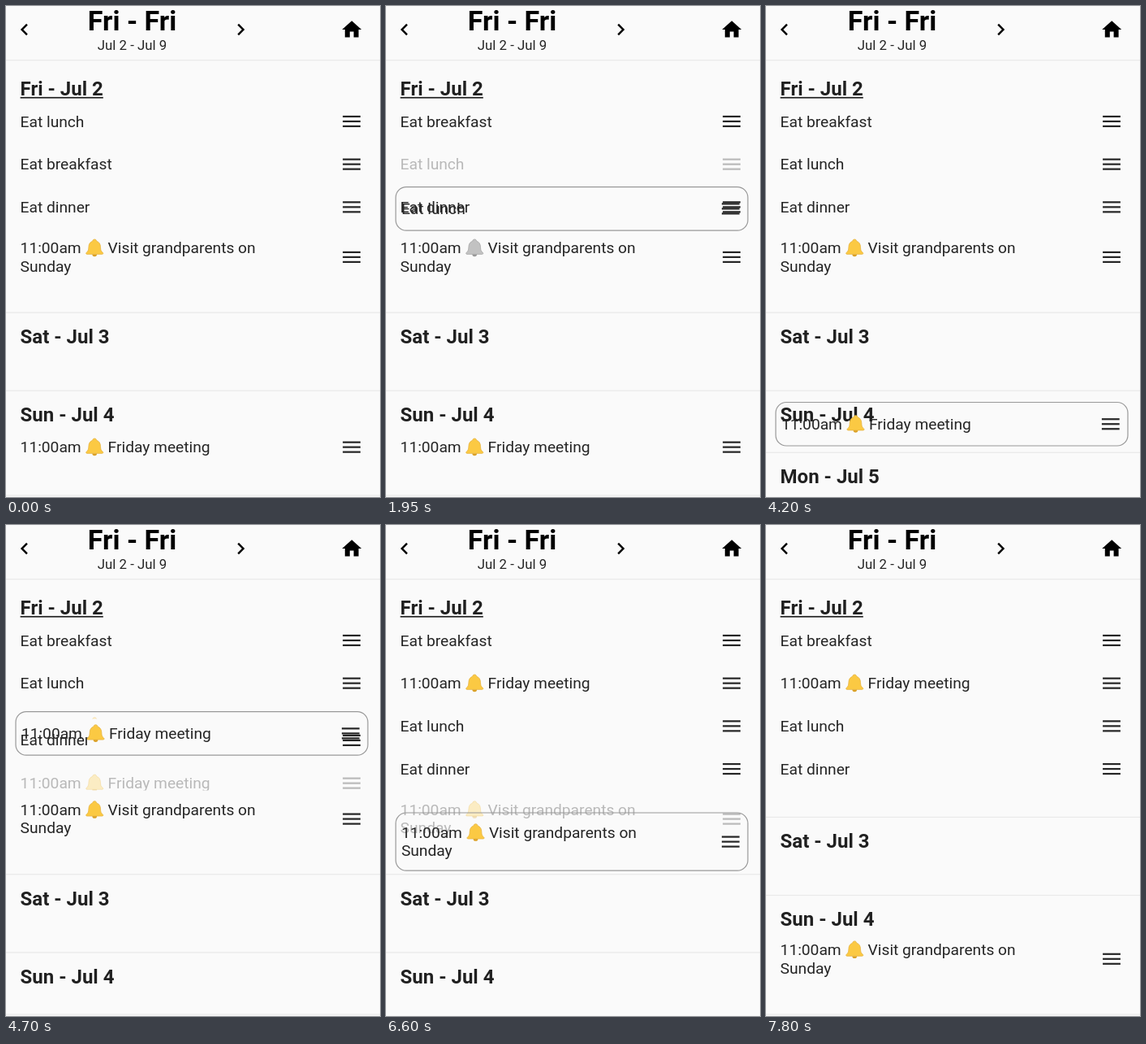
Animation of 461x604 px, one loop 9.45 s. Source, as an HTML page with a canvas:

```html
<!DOCTYPE html>
<html lang="en">
<head>
<meta charset="utf-8">
<title>Week planner</title>
<style>
  html, body { margin: 0; width: 100%; height: 100%; overflow: hidden; background: #fafafa; }
  canvas { display: block; width: 461px; height: 604px; }
</style>
</head>
<body>
<canvas id="stage"></canvas>
<script>
const W = 461, H = 604, LOOP = 9450, STEP = 50;
const ROW = 52.7, LINE = 22.5, TALL = 70.4;
const INK = '#252525', FONT = 'Roboto, sans-serif';
const canvas = document.getElementById('stage');
const ctx = canvas.getContext('2d');
const ratio = window.devicePixelRatio || 1;
canvas.width = W * ratio;
canvas.height = H * ratio;

const TASKS = {
  lunch: { lines: ['Eat lunch'] },
  breakfast: { lines: ['Eat breakfast'] },
  dinner: { lines: ['Eat dinner'] },
  visit: { time: '11:00am', lines: ['Visit grandparents on', 'Sunday'] },
  meeting: { time: '11:00am', lines: ['Friday meeting'] }
};
const ICONS = {
  home: new Path2D('M10 20v-6h4v6h5v-8h3L12 3 2 12h3v8z'),
  prev: new Path2D('M15.41 7.41L14 6l-6 6 6 6 1.41-1.41L10.83 12z'),
  next: new Path2D('M10 6L8.59 7.41 13.17 12l-4.58 4.59L10 18l6-6z')
};
const BELL = new Path2D('M11 0C12.6 0 13.4 1 13.4 2.2C16.8 3.2 18.2 6 18.3 9.5C18.4 13.2 19 14.8 21 16.2C22 17 21.6 18.3 20.3 18.3H1.7C.4 18.3 0 17 1 16.2C3 14.8 3.6 13.2 3.7 9.5C3.8 6 5.2 3.2 8.6 2.2C8.6 1 9.4 0 11 0Z');

const clamp = v => Math.max(0, Math.min(1, v));
// Linear 150 ms size change whose first visible step is at t0.
const grow = (t, t0) => t < t0 ? 0 : clamp((t - t0 + STEP) / 150);
const height = id => TASKS[id].lines.length > 1 ? TALL : ROW;

// Monotone cubic through [time, value] points.
function track(points, t) {
  const n = points.length - 1;
  if (t <= points[0][0]) return points[0][1];
  if (t >= points[n][0]) return points[n][1];
  const slope = i => (points[i + 1][1] - points[i][1]) / (points[i + 1][0] - points[i][0]);
  const tangent = i => {
    if (i === 0 || i === n) return 0;
    const a = slope(i - 1), b = slope(i);
    return a * b > 0 ? 2 * a * b / (a + b) : 0;
  };
  let i = 0;
  while (t > points[i + 1][0]) i++;
  const [t0, v0] = points[i], [t1, v1] = points[i + 1];
  const d = t1 - t0, u = (t - t0) / d, w = 1 - u;
  return v0 * (1 + 2 * u) * w * w + d * tangent(i) * u * w * w
    + v1 * u * u * (3 - 2 * u) - d * tangent(i + 1) * u * u * w;
}

const DRAGS = [
  { id: 'lunch', from: 1200, to: 2400, path: [[1200, 115.5], [1450, 168.7], [2050, 225], [2100, 225], [2200, 238]] },
  { id: 'meeting', from: 4000, to: 5350, path: [[4000, 516], [4200, 487.5], [4500, 342], [4750, 208], [4900, 166], [5000, 160.5]] },
  { id: 'visit', from: 6300, to: 7800, path: [[6300, 326.5], [6600, 354], [7100, 457], [7200, 482], [7400, 520], [7500, 525]] }
];

const ghost = (id, size) => ({ id, size, alpha: 0.3 });

// Lists of tasks per day; `fixed` keeps the list height while rows inside settle.
function plan(t) {
  const fri = { name: 'Fri - Jul 2', underline: true, pad: 0 };
  const sat = { name: 'Sat - Jul 3', pad: 20, rows: [] };
  const sun = { name: 'Sun - Jul 4', pad: 0, rows: ['meeting'] };
  const mon = { name: 'Mon - Jul 5', pad: 20, rows: [] };
  if (t < 1200) {
    fri.rows = ['lunch', 'breakfast', 'dinner', 'visit'];
  } else if (t < 2400) {
    const q = grow(t, 1700);
    fri.rows = [ghost('lunch', grow(t, 1200) * (1 - q)), 'breakfast', ghost('lunch', q), 'dinner', 'visit'];
    fri.fixed = 3 * ROW + TALL;
  } else if (t < 4000) {
    fri.rows = ['breakfast', 'lunch', ghost('lunch', 1 - grow(t, 2400)), 'dinner', 'visit'];
    fri.fixed = 3 * ROW + TALL;
  } else if (t < 5350) {
    const [a, b, c, d] = [4300, 4550, 4700, 4900].map(s => grow(t, s));
    const g = size => ghost('meeting', size);
    fri.rows = ['breakfast', g(d), 'lunch', g(c - d), 'dinner', g(b - c), 'visit'];
    sat.rows = [g(a - b)];
    sun.rows = [g(1 - grow(t, 4000))];
  } else if (t < 6300) {
    fri.rows = ['breakfast', 'meeting', ghost('meeting', 1 - grow(t, 5350)), 'lunch', 'dinner', 'visit'];
    fri.fixed = 4 * ROW + TALL;
    sun.rows = [];
    sun.pad = 20;
  } else {
    fri.rows = ['breakfast', 'meeting', 'lunch', 'dinner'];
    sun.rows = ['visit'];
    if (t < 7800) {
      const a = grow(t, 6850), b = grow(t, 7250);
      fri.rows.push(ghost('visit', 1 - a));
      sat.rows = [ghost('visit', a - b)];
      sun.rows = [ghost('visit', b)];
      sun.pad = 20;
    }
  }
  return [fri, sat, sun, mon];
}

function text(str, x, mid, size, weight = 400, color = INK) {
  ctx.font = `${weight} ${size}px ${FONT}`;
  ctx.fillStyle = color;
  ctx.fillText(str, x, mid + size * 0.3415);
}

function icon(name, x, y) {
  ctx.save();
  ctx.translate(x, y);
  ctx.scale(1.2, 1.2);
  ctx.fillStyle = '#000';
  ctx.fill(ICONS[name]);
  ctx.restore();
}

function divider(y) {
  ctx.fillStyle = '#e9e9e9';
  ctx.fillRect(0, y - 0.6, W, 1.2);
}

function bell(x, y, gray) {
  ctx.save();
  ctx.translate(x, y);
  ctx.fillStyle = gray ? '#999' : '#dba126';
  ctx.beginPath();
  ctx.arc(11, 18.2, 2.9, 0, Math.PI);
  ctx.fill();
  ctx.fillStyle = gray ? '#c2c2c2' : '#fbc943';
  ctx.fill(BELL);
  ctx.strokeStyle = gray ? '#a6a6a6' : '#e6b443';
  ctx.lineWidth = 0.8;
  ctx.stroke(BELL);
  ctx.restore();
}

function task(id, x, mid, handleX, gray) {
  const { time, lines } = TASKS[id];
  const first = mid - (lines.length - 1) * LINE / 2;
  if (time) {
    text(time, x, first, 19.2);
    bell(x + 80.6, first - 10.6, gray);
  }
  lines.forEach((line, i) => text(line, x + (time && !i ? 108 : 0), first + i * LINE, 19.2));
  ctx.fillStyle = INK;
  for (const dy of [-6, 0, 6]) ctx.fillRect(handleX - 10.9, mid + dy - 1.1, 21.8, 2.2);
}

function row(entry, y, gray) {
  const { id, size = 1, alpha = 1 } = entry.id ? entry : { id: entry };
  const full = height(id), h = full * size;
  if (h > 0.01) {
    ctx.save();
    ctx.beginPath();
    ctx.rect(0, y, W, h);
    ctx.clip();
    ctx.globalAlpha = alpha;
    task(id, 17.6, y + full / 2, 426, gray);
    ctx.restore();
  }
  return h;
}

function day(d, top, gray) {
  text(d.name, 17.6, top + 29.8, 24, 700, '#202020');
  if (d.underline) ctx.fillRect(17.6, top + 39.4, ctx.measureText(d.name).width, 1.7);
  const start = top + 43.1 + d.pad;
  let y = start;
  for (const r of d.rows) y += row(r, y, gray && r === 'visit');
  const end = (d.fixed ? start + d.fixed : y) + 33;
  divider(end);
  return end;
}

function card({ id, path }, t) {
  const y = track(path, t), h = height(id) + 0.8;
  ctx.beginPath();
  ctx.roundRect(12, y, 434, h, 13);
  ctx.strokeStyle = '#999';
  ctx.lineWidth = 1.2;
  ctx.stroke();
  task(id, 18.9, y + h / 2, 424.8);
}

function draw(t) {
  ctx.setTransform(ratio, 0, 0, ratio, 0, 0);
  ctx.fillStyle = '#fafafa';
  ctx.fillRect(0, 0, W, H);
  ctx.textAlign = 'center';
  text('Fri - Fri', 155.5, 18.7, 34, 700, '#000');
  text('Jul 2 - Jul 9', 155.5, 48.6, 16.8);
  ctx.textAlign = 'left';
  icon('prev', 8.3, 14.6);
  icon('next', 275, 14.6);
  icon('home', 411.8, 14.6);
  divider(66.7);
  const gray = t >= 1200 && t < 2400;
  let y = 72.5;
  for (const d of plan(t)) y = day(d, y, gray);
  const drag = DRAGS.find(d => t >= d.from && t < d.to);
  if (drag) card(drag, t);
}

const begin = performance.now();
function tick() {
  const t = (performance.now() - begin) % LOOP;
  draw(Math.floor(t / STEP) * STEP);
  requestAnimationFrame(tick);
}
tick();
</script>
</body>
</html>
```
